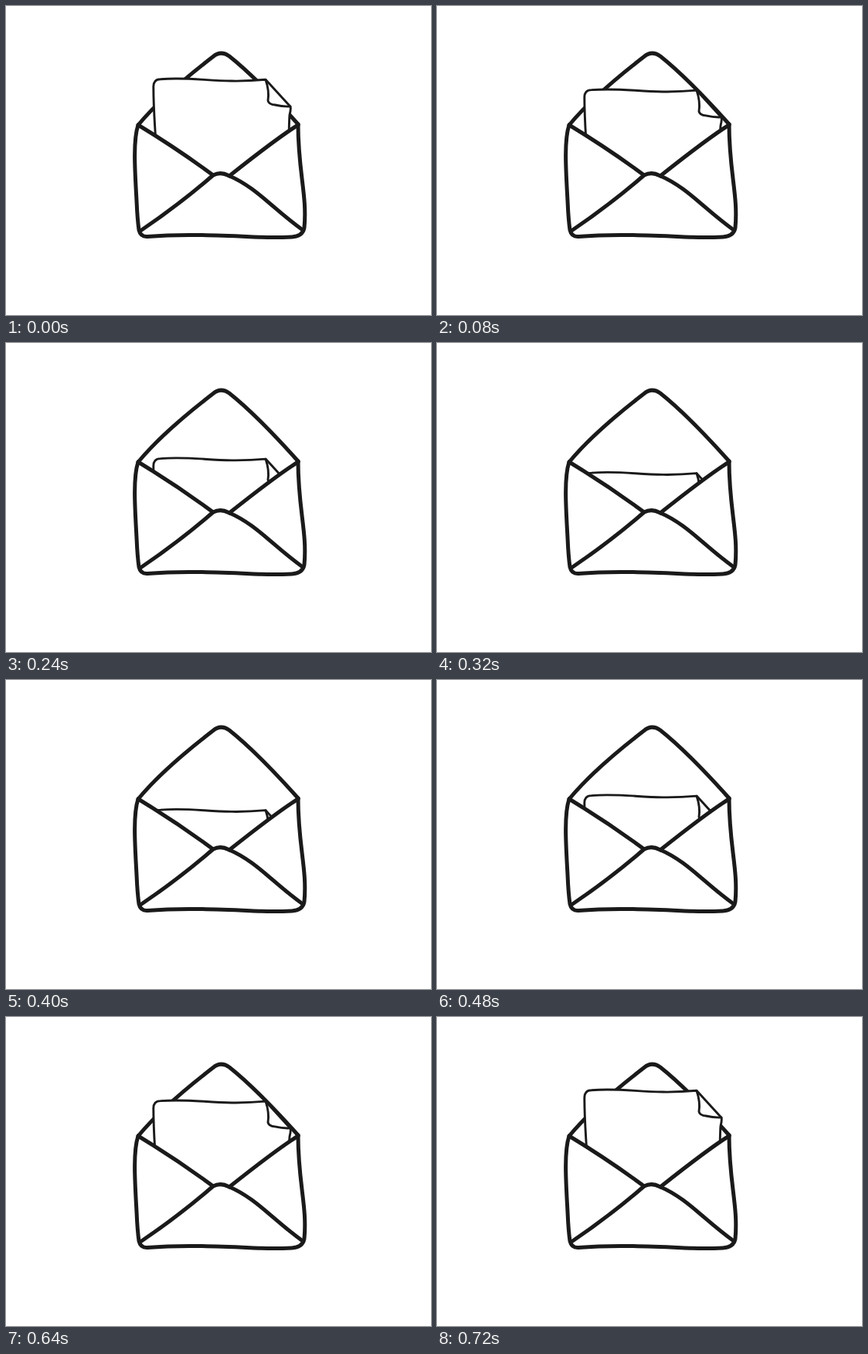
Animation, 550 px wide and 400 px high, one loop 800 ms. Source, as an HTML page:

```html
<!DOCTYPE html>
<html lang="en">
<head>
<meta charset="utf-8">
<title>Letter in an envelope</title>
<style>
  html, body { margin: 0; width: 100%; height: 100%; overflow: hidden; background: #fff; }
  svg { display: block; width: 550px; height: 400px; }
  path { fill: none; stroke: #1a1a1a; stroke-width: 5; stroke-linecap: round; stroke-linejoin: round; }
  #letter path { stroke-width: 2.9; }
  path.fill { fill: #fff; stroke: none; }
</style>
</head>
<body>
<svg viewBox="0 0 550 400">
  <path d="M172 153C197 123 231 94 268 65.5Q278 57 289 65C318 88 352 124 378 153"/>

  <g id="letter">
    <path class="fill" d="M194 200L191 105Q191 95 200 94.8C245 91 275 101 336 95.5L368 130Q366 140 366 200Z"/>
    <path d="M194 180C193 155 191 140 190.8 105Q190.5 95 200 94.8C245 91 275 101 336 95.3L368 130.3Q369 133 367 141Q366 152 366 200"/>
    <path d="M336 95.5Q341 110 339 122.5Q340 127.5 348 128Q358 130.5 368 130"/>
  </g>

  <path class="fill" d="M171 154Q222 185 268 219H289C318 197 352 170 378 154L386 287Q384 299 370 299L184 298L172 290Z"/>
  <path d="M171 154C164 175 167 215 169 252Q170 276 172 290Q174 299 183 298.5C230 294.5 275 297 330 299.3Q350 300 370 299Q384 298 386 287C390 245 378 215 378 153"/>
  <path d="M171 154Q222 185 268 219M378 154C352 170 318 197 289 220"/>
  <path d="M174 291C208 268 238 245 268 219Q278 214 288 219.5C323 234 346 263 384 290"/>
</svg>
<script>
  const LOOP = 800, STEP = 40, HALF = 360, DEPTH = 78.5;
  const letter = document.getElementById('letter');

  // cubic-bezier(1/6, 0, 5/6, 1), solved by bisection
  function ease(x) {
    let lo = 0, hi = 1;
    for (let i = 0; i < 24; i++) {
      const s = (lo + hi) / 2, r = 1 - s;
      if (s * r * r / 2 + 2.5 * s * s * r + s ** 3 < x) lo = s;
      else hi = s;
    }
    return lo * lo * (3 - 2 * lo);
  }

  function draw(now) {
    const t = Math.min(Math.floor(now % LOOP / STEP) * STEP, 2 * HALF);
    const depth = DEPTH * ease(1 - Math.abs(t - HALF) / HALF);
    letter.setAttribute('transform', `translate(0 ${depth.toFixed(2)})`);
  }

  const start = performance.now();
  function tick() {
    draw(performance.now() - start);
    requestAnimationFrame(tick);
  }
  tick();
</script>
</body>
</html>
```
